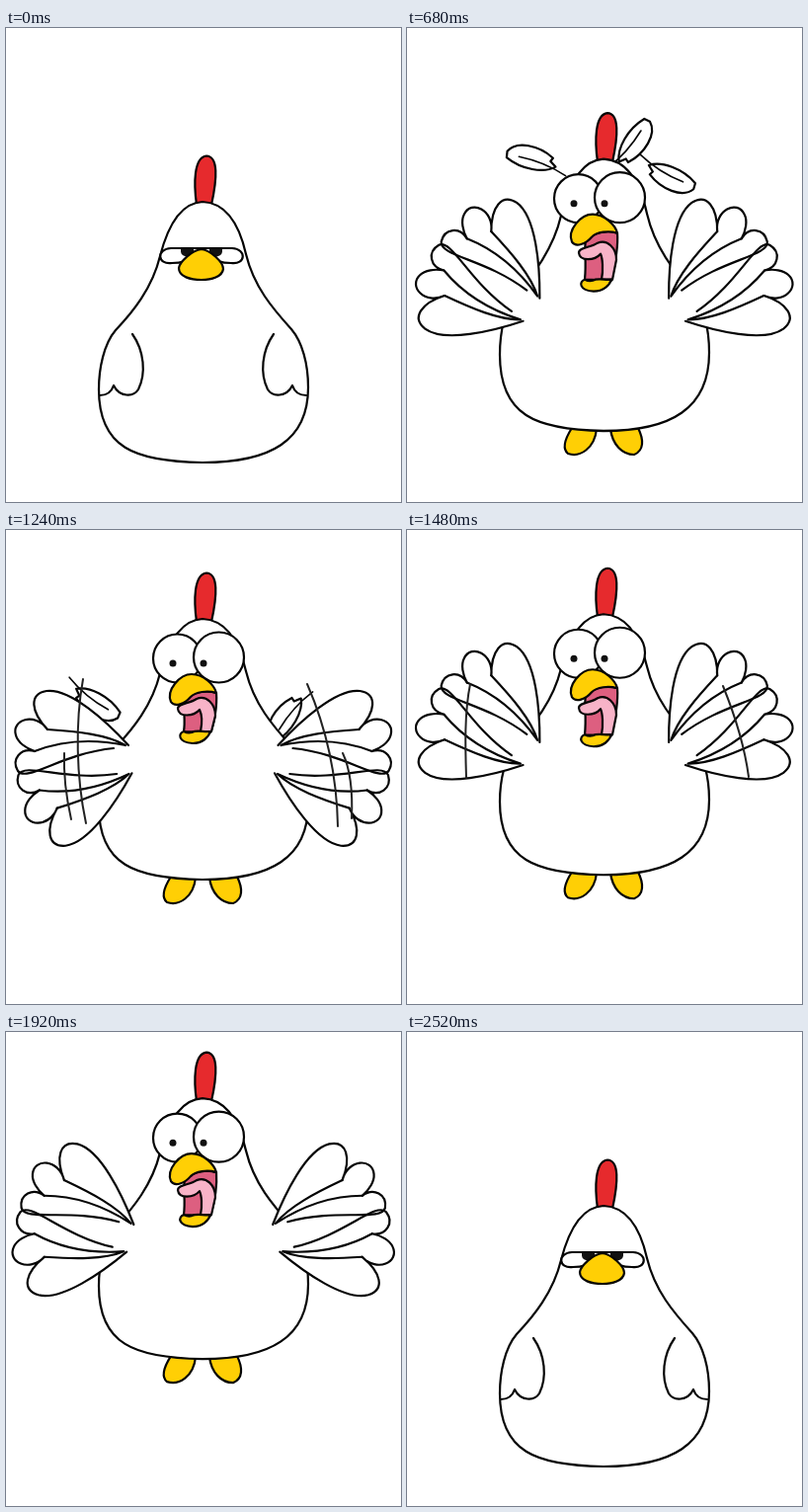
An HTML page that plays this animation: 400x480 px, repeating every 2.56 s.

```html
<!DOCTYPE html>
<html lang="en">
<head>
<meta charset="utf-8">
<title>Startled hen</title>
<style>
  html, body { margin: 0; width: 100%; height: 100%; overflow: hidden; background: #fff; }
  svg { display: block; width: 400px; height: 480px; }
  .ink { fill: none; stroke: #050505; stroke-width: 2.2; stroke-linecap: round; stroke-linejoin: round; }
  .white { fill: #fff; }
  .yellow { fill: #ffcf05; }
  .red { fill: #e62a2d; }
  .mouth { fill: #dd5f80; }
  .tongue { fill: #f8b3c8; }
  .dot { fill: #111; stroke: none; }
  .plain { stroke: none; }
  .swish { stroke: #222; stroke-width: 2; }
</style>
</head>
<body>
<svg viewBox="0 0 400 480">
  <defs>
    <g id="feather">
      <path class="white" d="M-31 3C-27 -11 -4 -16 14 -10L13 -6L20 -3C12 8 -10 14 -29 9Z"/>
      <path d="M-18 3Q8 -3 33 1" stroke-width="1.6"/>
    </g>
    <path id="rim" d="M-3 -14C-25 -38 -62 -72 -86 -69C-104 -66 -102 -48 -85 -30C-98 -48 -122 -40 -117 -24C-115 -17 -107 -11 -98 -8C-112 -12 -122 0 -115 12C-106 24 -70 -6 -18 -11"/>
    <g id="fan" transform="rotate(7)">
      <use href="#rim"/>
      <path d="M-85 -30C-55 -28 -25 -25 -6 -14M-98 -8C-70 -19 -40 -21 -6 -14"/>
    </g>
    <g id="wing">
      <g class="white plain">
        <path d="M-3 -14L-100 -20V20L-3 14L5 0Z"/>
        <use href="#rim" transform="rotate(7)"/>
        <use href="#rim" transform="scale(1 -1) rotate(7)"/>
      </g>
      <use href="#fan"/>
      <use href="#fan" transform="scale(1 -1)"/>
    </g>
    <path id="arm" d="M128 310C140 327 142 350 134 366C129 374 115 374 109 362C107 368 103 372 95 372"/>
    <g id="lid">
      <path class="white" d="M199 223H167C152 224 153 240 168 238C179 238 185 236 189 231"/>
      <path class="dot" d="M177 223H190V230C186 233 177 232 177 226Z"/>
    </g>
  </defs>

  <g class="ink">
    <g id="feathers">
      <use href="#feather"/><use href="#feather"/><use href="#feather"/>
    </g>
    <g id="comb"><path class="red" d="M193 179C190 158 190 131 203 129.500C215 130 214 152 208 179Z"/></g>
    <g id="feet" class="yellow">
      <path d="M167 437C160 448 157 458 163 463C175 467 190 458 192 438Z"/>
      <path d="M206 438C208 454 218 464 230 464C240 460 240 449 234 437Z"/>
    </g>
    <path id="body" class="white" d="M199 176C177 177 164 200 156 231C148 264 128 288 111 306C99 320 94 345 94 366C94 425 130 439 199 440C268 440 306 418 306 364C306 340 300 318 289 305C270 284 251 262 243 229C236 198 222 177 199 176Z"/>

    <g id="calm">
      <use href="#lid"/>
      <use href="#lid" transform="matrix(-1 0 0 1 396 0)"/>
      <path class="yellow" d="M198 224C207 225 220 237 220 244C219 252 208 255 198 255C187 255 175 252 175 243C176 237 188 225 198 224Z"/>
    </g>
    <g id="arms">
      <use href="#arm"/>
      <use href="#arm" transform="matrix(-1 0 0 1 399 0)"/>
    </g>

    <g id="shock">
      <circle class="white" cx="173.500" cy="216" r="24.500"/>
      <circle class="white" cx="215.500" cy="215" r="25.500"/>
      <circle class="dot" cx="169" cy="221" r="3.500"/>
      <circle class="dot" cx="200" cy="221" r="3.500"/>
      <path id="mouth" class="mouth"/>
      <path id="tongue" class="tongue"/>
      <path id="jaw" class="yellow" d="M180 290C174 292 174 301 189 302C199 302 205 296 207 290C200 291 194 288 188 291C185 292 182 291 180 290Z"/>
      <path class="yellow" d="M167 260C162 248 176 232 188 232C200 232 211 243 213 251C204 248 192 250 187 255C181 262 171 266 167 260Z"/>
    </g>

    <g id="wings">
      <use id="wingL" href="#wing"/>
      <use id="wingR" href="#wing"/>
    </g>
    <path id="low" class="swish" d="M78 151C70 195 71 250 81 297M59 226C58 250 62 275 66 293M305 156C322 195 335 240 336 300M341 226C350 245 351 270 350 292"/>
    <path id="high" class="swish" d="M64 156C58 185 59 220 60 251M320 158C333 190 342 220 346 250"/>
  </g>
</svg>
<script>
  const LOOP = 2560, STEP = 40, FLAP = 160;
  const el = id => document.getElementById(id);
  const place = (node, value) => node.setAttribute('transform', value);
  const show = (id, on) => { el(id).style.display = on ? '' : 'none'; };

  // Keys are [time, value]; linear in between.
  function at(t, keys) {
    let i = keys.findIndex(k => k[0] > t);
    if (i < 0) return keys[keys.length - 1][1];
    if (i === 0) return keys[0][1];
    const [t0, a] = keys[i - 1], [t1, b] = keys[i];
    return a + (b - a) * (t - t0) / (t1 - t0);
  }

  const lift = [[560, 0], [600, -8], [640, -24], [760, -58], [840, -72], [880, -70.5], [920, -67],
    [1240, -86], [1400, -92], [1720, -107], [2040, -114], [2120, -118], [2160, -112],
    [2240, -80], [2320, -40], [2360, -22], [2400, -5], [2440, 0]];
  const stretch = [[400, 1], [480, .93], [560, .94], [600, 1.05], [880, 1.025], [960, 1],
    [2360, 1], [2440, .95], [2520, 1]];
  const legs = [[560, 0], [640, 1], [2320, 1], [2400, 0]];
  const bobbing = [[600, 0], [720, 5], [2120, 5], [2240, 0]];

  // Each feather: x, y and turn over time.
  const drift = [
    { x: [[600, 150], [760, 112], [880, 105], [1240, 88]],
      y: [[600, 190], [760, 80], [880, 86], [1240, 172], [1440, 220]],
      r: [[600, 40], [880, -14], [1240, -138]] },
    { x: [[600, 215], [760, 238], [880, 245], [1240, 210]],
      y: [[600, 190], [760, 48], [880, 57], [1240, 200]],
      r: [[600, 120], [880, 170], [1240, 230]] },
    { x: [[600, 250], [760, 276], [880, 281], [1240, 287]],
      y: [[600, 200], [760, 96], [880, 110], [1240, 187], [1440, 230]],
      r: [[600, -160], [880, -108], [1240, -46]] }
  ];

  function draw(t) {
    const phase = (t + 40) % FLAP / FLAP;
    const beat = Math.cos(phase * 2 * Math.PI);
    const shocked = t >= 520 && t < 2400;
    const flying = t >= 560 && t < 2400;

    const y = at(t, lift) + at(t, bobbing) * (1 - beat) / 2;
    const s = at(t, stretch);
    const top = y - 264 * (s - 1);
    place(el('body'), `translate(0 ${y + 440 * (1 - s)}) scale(1 ${s})`);
    for (const id of ['comb', 'calm', 'shock']) place(el(id), `translate(0 ${top})`);
    place(el('arms'), `translate(0 ${y})`);
    place(el('feet'), `translate(0 ${y - 26 * (1 - at(t, legs))})`);

    show('calm', !shocked);
    show('shock', shocked);
    show('arms', !flying);
    show('wings', flying);
    show('feet', flying);

    const j = 4 - 4 * beat, h = j / 2;
    el('mouth').setAttribute('d',
      `M181 258C190 249 205 248 213 251C214 264 211 282 207 ${291 + j}L180 ${290 + j}C182 278 179 269 181 258Z`);
    el('tongue').setAttribute('d',
      `M174 ${267 + h}C174 ${261 + h} 186 ${262 + h} 193 ${257 + h}C203 ${253 + h} 212 ${262 + h} 212 ${274 + h}` +
      `L208 ${290 + j}H197C199 ${280 + j} 198 ${272 + h} 196 ${268 + h}C190 ${275 + h} 175 ${276 + h} 174 ${267 + h}Z`);
    place(el('jaw'), `translate(0 ${j})`);

    const turn = 14.5 - 21.5 * beat;
    place(el('wingL'), `translate(127 ${318 + y}) rotate(${turn})`);
    place(el('wingR'), `translate(272.5 ${318 + y}) scale(-1 1) rotate(${turn})`);

    const swish = t >= 960 && t < 2160;
    show('low', swish && phase < .25);
    show('high', swish && phase >= .5 && phase < .75);

    show('feathers', t >= 600 && t < 1440);
    el('feathers').style.opacity = at(t, [[1300, 1], [1440, 0]]);
    drift.forEach((f, i) => place(el('feathers').children[i],
      `translate(${at(t, f.x)} ${at(t, f.y)}) rotate(${at(t, f.r)})`));
  }

  const start = performance.now();
  function tick() {
    const t = (performance.now() - start) % LOOP;
    draw(Math.floor(t / STEP) * STEP);
    requestAnimationFrame(tick);
  }
  tick();
</script>
</body>
</html>
```
